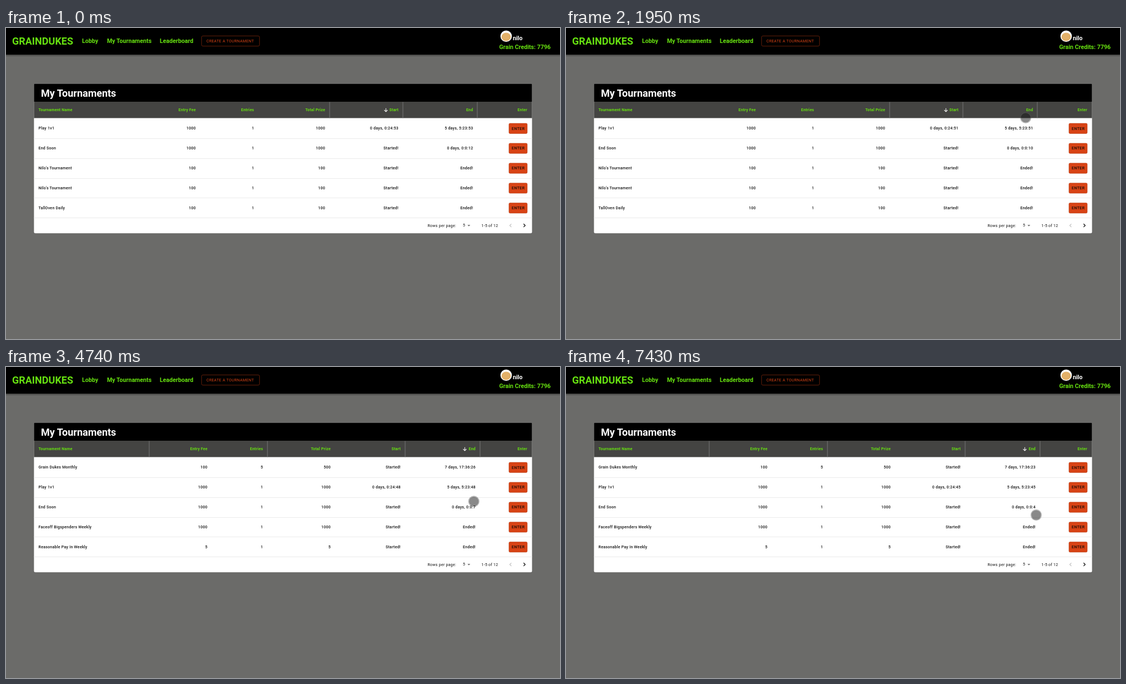
Write an HTML page that moves like this. It is 998 by 561 pixels and loops after 8000 ms.

```html
<!DOCTYPE html>
<html lang="en">
<head>
<meta charset="utf-8">
<title>My Tournaments</title>
<style>
  html, body { margin: 0; width: 100%; height: 100%; overflow: hidden; background: #6b6b69; }
  svg { display: block; width: 998px; height: 561px; font-family: Roboto, sans-serif; }
  .nav { font-size: 10.67px; font-weight: 700; fill: #66e010; }
  .cell { font-size: 7px; font-weight: 500; letter-spacing: .26px; fill: #111; }
  .head { fill: #66e010; font-weight: 700; letter-spacing: .2px; }
  .foot { font-weight: 400; }
  .btn { letter-spacing: .4px; fill: #1a0d08; }
</style>
</head>
<body>
<svg viewBox="0 0 998 561">
  <defs>
    <linearGradient id="shade" x1="0" y1="0" x2="0" y2="1">
      <stop offset="0" stop-color="#000" stop-opacity=".38"/>
      <stop offset="1" stop-color="#000" stop-opacity="0"/>
    </linearGradient>
  </defs>
  <rect width="998" height="561" fill="#6b6b69"/>
  <rect y="48" width="998" height="4" fill="url(#shade)"/>
  <rect width="998" height="48" fill="#000"/>
  <text x="11" y="29.5" font-size="18" font-weight="700" fill="#66e010">GRAINDUKES</text>
  <g class="nav">
    <text x="137" y="27">Lobby</text>
    <text x="182" y="27">My Tournaments</text>
    <text x="277" y="27">Leaderboard</text>
    <text x="888.5" y="38">Grain Credits: 7796</text>
    <text x="913" y="21.5" fill="#fff">nilo</text>
  </g>
  <rect x="352.3" y="14.3" width="104.4" height="18.4" rx="2.5" fill="none" stroke="#7c260c" stroke-width=".8"/>
  <text x="361" y="26" font-size="7" letter-spacing=".33" fill="#d84315">CREATE A TOURNAMENT</text>
  <circle cx="901" cy="14.7" r="10.3" fill="#fff"/>
  <ellipse cx="901" cy="16" rx="8.4" ry="7.4" fill="#e3b069"/>

  <rect x="50.4" y="100.4" width="897.2" height="269.8" rx="2.5" fill="#fff"/>
  <path d="M50.4 133V102.4q0-2 2-2H945.6q2 0 2 2V133Z" fill="#000"/>
  <text x="63" y="123.6" font-size="18" font-weight="700" fill="#fff">My Tournaments</text>
  <rect x="50.4" y="133" width="897.2" height="29.5" fill="#444442"/>
  <g id="table"></g>
  <g class="cell foot">
    <text x="759.5" y="358.7">Rows per page:</text>
    <text x="823" y="358.2">5</text>
    <text x="856.5" y="358.7">1-5 of 12</text>
  </g>
  <path d="M831.3 355.2h5l-2.5 2.6Z" fill="#666"/>
  <path d="M910.4 353.3l-2.9 2.9 2.9 2.9" fill="none" stroke="#bbb" stroke-width="1.1"/>
  <path d="M932.4 353.3l2.9 2.9-2.9 2.9" fill="none" stroke="#111" stroke-width="1.3"/>
  <path id="arrow" d="M0-3.2V3M-3 0L0 3 3 0" fill="none" stroke="#eee" stroke-width="1.1"/>
  <g id="cursor">
    <circle r="8.7" fill="#141414" fill-opacity=".5"/>
    <circle r="9.4" fill="none" stroke="#555" stroke-opacity=".38" stroke-width="1.5"/>
  </g>
</svg>
<script>
const LOOP = 8000, FIRST_TICK = 80, TICK = 1012;
const LEFT = 50, WIDTH = 898, PAD = 8, ROW = 35.9;
const COLUMNS = ["Entry Fee", "Entries", "Total Prize", "Start", "End"];

// Each row: name, fee, entries. The prize is fee times entries.
const byStart = [
  ["Play 1v1", 1000, 1], ["End Soon", 1000, 1], ["Nilo's Tournament", 100, 1],
  ["Nilo's Tournament", 100, 1], ["TallOven Daily", 100, 1]
];
const byEndUp = [
  ["Nilo's tournament", 100, 1], ["Talloven", 1000, 1], ["TallOven Daily", 100, 1],
  ["For Fun Beginners", 1, 2], ["Nilo's Tournament", 100, 1]
];
const byEndDown = [
  ["Grain Dukes Monthly", 100, 5], ["Play 1v1", 1000, 1], ["End Soon", 1000, 1],
  ["Faceoff Bigspenders Weekly", 1000, 1], ["Reasonable Pay In Weekly", 5, 1]
];

// Running clocks, n seconds after the first second shown.
const over = ["Started!", "Ended!"];
const soon = n => [`0 days, 0:24:${53 - n}`, `5 days, 5:23:${53 - n}`];
const ending = n => ["Started!", `0 days, 0:0:${12 - n}`];
const weekly = n => ["Started!", `7 days, 17:36:${31 - n}`];

// Content widths of the name, start and end columns, and the separators that show.
const PHASES = [
  { from: 0, rows: byStart, clocks: [soon, ending], fit: [173, 126, 128], lines: [3, 4, 5] },
  { from: 2260, rows: byEndUp, clocks: [soon, ending], fit: [173, 126, 128], lines: [3, 4, 5] },
  { from: 3060, rows: byEndUp, clocks: [], fit: [173, 87, 81], lines: [0, 1, 3, 4] },
  { from: 3690, rows: byEndDown, clocks: [], fit: [208, 87, 81], lines: [0, 1, 3, 4] },
  { from: 4120, rows: byEndDown, clocks: [weekly, soon, ending], fit: [208, 126, 135], lines: [0, 2, 4, 5] }
];
const [, SORT_UP, , SORT_DOWN] = PHASES.map(p => p.from);

// Pointer moves: begin, end, target and an optional bend.
const ENTRY = [893, 572];
const MOVES = [
  [440, 1290, [748.5, 337], [690, 466]],
  [1310, 2080, [834, 157], [795, 185]],
  [2260, 2500, [831, 153]],
  [3690, 4090, [828.5, 155]],
  [4110, 4470, [842, 235]],
  [4580, 5370, [849, 303.5]],
  [5590, 5770, [816, 268]],
  [5920, 6050, [834, 268]],
  [6210, 6830, [847, 267], [834, 265]]
];

const byId = id => document.getElementById(id);
const table = byId("table"), arrow = byId("arrow"), cursor = byId("cursor");
const progress = (t, from, to) => Math.min(1, Math.max(0, (t - from) / (to - from)));
const smooth = k => k * k * (3 - 2 * k);

function add(tag, attrs, content = "") {
  const el = document.createElementNS("http://www.w3.org/2000/svg", tag);
  for (const name in attrs) el.setAttribute(name, attrs[name]);
  el.textContent = content;
  table.append(el);
}
const label = (text, x, y, kind = "", anchor = "end") =>
  add("text", { x, y, class: "cell " + kind, "text-anchor": anchor }, text);

// Columns share the full width in proportion to their content.
function bordersOf([name, start, end]) {
  const widths = [name, 113, 100, 122, start, end, 94];
  const scale = WIDTH / widths.reduce((a, b) => a + b);
  let x = LEFT;
  return widths.map(w => x += w * scale);
}

function drawTable({ rows, clocks, fit, lines }, n) {
  const borders = bordersOf(fit);
  const edge = c => borders[c + 1] - PAD;
  table.replaceChildren();
  for (const i of lines)
    add("rect", { x: Math.round(borders[i]) - .5, y: 133.5, width: 1, height: 29, fill: "#777" });
  label("Tournament Name", 58.5, 150.3, "head", "start");
  [...COLUMNS, "Enter"].forEach((name, c) => label(name, edge(c) - (c > 4), 150.3, "head"));
  rows.forEach(([name, fee, entries], i) => {
    const y = 181 + i * ROW;
    const times = clocks[i] ? clocks[i](n) : over;
    add("rect", { x: LEFT + .4, y: Math.round(y + 17.7), width: WIDTH - .8, height: 1, fill: "#ebebeb" });
    label(name, 58.5, y + 2.4, "", "start");
    [fee, entries, fee * entries, ...times].forEach((value, c) => label(value, edge(c), y + 2.4));
    add("rect", { x: 906, y: y - 9, width: 33, height: 18.4, rx: 2, fill: "#d84315", stroke: "#b23a14", "stroke-width": .6 });
    label("ENTER", 922.8, y + 2.5, "btn", "middle");
  });
}

function pointerAt(t) {
  let at = ENTRY;
  for (const [from, to, target, bend] of MOVES) {
    if (t < from) break;
    const k = smooth(progress(t, from, to));
    at = at.map((start, i) => {
      const mid = bend ? bend[i] : (start + target[i]) / 2;
      return (1 - k) ** 2 * start + 2 * k * (1 - k) * mid + k * k * target[i];
    });
  }
  return at;
}

let drawn = "";
function render(t) {
  const n = Math.floor((t - FIRST_TICK) / TICK) + 1;
  const index = PHASES.filter(p => p.from <= t).length - 1;
  const phase = PHASES[index];
  if (drawn !== index + ":" + n) {
    drawn = index + ":" + n;
    drawTable(phase, n);
  }
  const borders = bordersOf(phase.fit);
  const x = t < SORT_UP ? borders[4] - 30.7 : borders[5] - 27.5;
  const turn = t < SORT_UP ? 0 : 180 * (1 - progress(t, SORT_DOWN, SORT_DOWN + 200));
  arrow.setAttribute("transform", `translate(${x} 148) rotate(${turn})`);
  cursor.setAttribute("transform", `translate(${pointerAt(t)})`);
}

const begin = performance.now();
function frame() {
  render((performance.now() - begin) % LOOP);
  requestAnimationFrame(frame);
}
frame();
</script>
</body>
</html>
```
